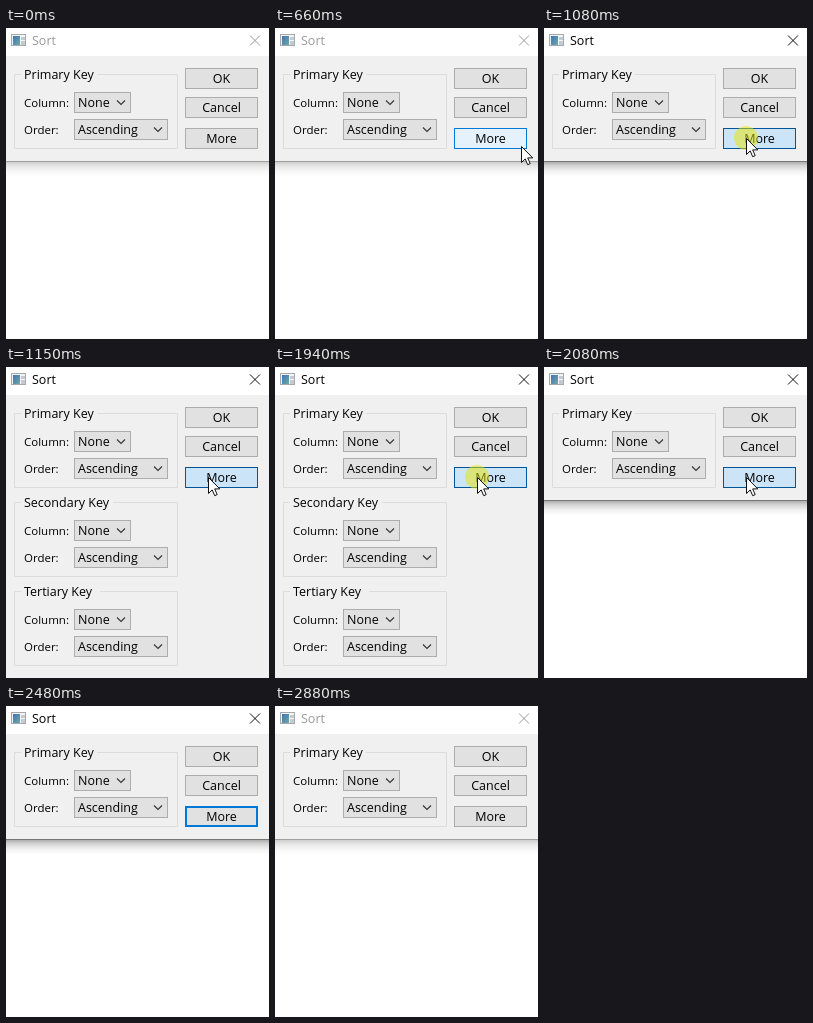
Recreate the animation shown at these times as an HTML page. Size 263 px wide and 311 px high, loop 2.95 s.

```html
<!DOCTYPE html>
<html lang="en">
<head>
<meta charset="utf-8">
<title>Sort</title>
<style>
html, body { margin: 0; width: 100%; height: 100%; overflow: hidden; background: #fff; }
svg { display: block; width: 263px; height: 311px; font: 12.5px "Open Sans", "Noto Sans", sans-serif; }
.label { font-size: 11.5px; }
.mid { text-anchor: middle; }
.box { fill: #e1e1e1; stroke: #adadad; }
.line { fill: none; stroke: #333; stroke-width: 1.1; }
</style>
</head>
<body>
<svg viewBox="0 0 263 311">
  <defs>
    <linearGradient id="fade" x2="0" y2="1">
      <stop offset="0" stop-opacity=".36"/>
      <stop offset=".3" stop-opacity=".17"/>
      <stop offset=".65" stop-opacity=".05"/>
      <stop offset="1" stop-opacity="0"/>
    </linearGradient>
    <linearGradient id="pane" x2="1" y2="1">
      <stop offset="0" stop-color="#3f74b5"/>
      <stop offset="1" stop-color="#6fa9a4"/>
    </linearGradient>
  </defs>
  <rect id="shadow" y="133" width="263" height="16" fill="url(#fade)"/>
  <rect id="panel" y="28" width="263" fill="#f0f0f0"/>
  <rect id="edge" y="133" width="263" height="1"/>
  <rect width="263" height="28" fill="#fff"/>
  <rect x="5.5" y="6.5" width="14" height="11" fill="#f4f4f4" stroke="#a3a9ae"/>
  <rect x="7" y="8" width="7" height="9" fill="url(#pane)"/>
  <path d="M15 9h4v3h-4zM15 13h4v4h-4z" fill="#c3cbd0"/>
  <g id="title">
    <text x="26" y="17">Sort</text>
    <path id="close" d="M244 7.5l10 10m0-10l-10 10" fill="none"/>
  </g>
  <g id="main"></g>
  <g id="extra"></g>
  <g id="buttons"></g>
  <circle id="halo" cx="202" cy="110" r="12" fill="#e6e600" fill-opacity=".5"/>
  <path id="cursor" d="M.5.5v16l3.7-3.6 2.5 5.8 2.5-1.1-2.5-5.7h5.1z" fill="#fff" stroke="#111" stroke-linejoin="round"/>
</svg>
<script>
const $ = id => document.getElementById(id);
const set = (id, attrs) => {
  for (const k in attrs) $(id).setAttribute(k, attrs[k]);
};
const show = (id, on) => set(id, { visibility: on ? 'visible' : 'hidden' });

const combo = (y, w, text) =>
  `<rect class="box" x="68.5" y="${y + .5}" width="${w}" height="20"/>
   <text x="72" y="${y + 15}">${text}</text>
   <path class="line" d="M${68 + w - 13} ${y + 8.5}l4 4 4-4"/>`;

const group = (name, y, gap) =>
  `<g transform="translate(0 ${y})">
   <path d="M15 46.5H8.5v74h163v-74H${gap}" fill="none" stroke="#dcdcdc"/>
   <text x="18" y="51">${name}</text>
   <text class="label" x="18" y="79">Column:</text>
   <text class="label" x="18" y="106">Order:</text>
   ${combo(64, 56, 'None')}${combo(91, 93, 'Ascending')}</g>`;

const button = (text, y) =>
  `<rect class="box" id="${text}" x="179.5" y="${y + .5}" width="72" height="20"/>
   <text class="mid" x="215.5" y="${y + 15}">${text}</text>`;

$('main').innerHTML = group('Primary Key', 0, 91);
$('extra').innerHTML = group('Secondary Key', 89, 107) + group('Tertiary Key', 178, 94);
$('buttons').innerHTML = button('OK', 40) + button('Cancel', 69) + button('More', 100);

const looks = {
  normal: ['#e1e1e1', '#adadad', 1],
  hover: ['#e5f1fb', '#0078d7', 1],
  pressed: ['#cce4f7', '#005499', 1],
  focus: ['#e1e1e1', '#0078d7', 2]
};

const STEP = 67.5, LOOP = 2950;
const rest = { x: 202, y: 110 };
const clamp = v => Math.min(1, Math.max(0, v));

// Pointer slides in from the right edge and leaves the same way.
function pointer(t) {
  let away = 0;
  if (t < 940) {
    const n = Math.floor((t - 600) / STEP + .02) + 1;
    away = (1 - clamp(n / 6)) ** 2;
  } else if (t >= 2140) {
    const n = Math.floor((t - 2140) / STEP + .02);
    away = clamp(n / 5) ** 1.6;
  }
  return { x: Math.round(rest.x + 64 * away), y: Math.round(rest.y + 12 * away) };
}

function draw(t) {
  const active = t >= 1010 && t < 2880;
  const open = t >= 1150 && t < 2080;
  const present = t >= 600 && t < 2480;
  const p = pointer(t);
  const over = present && p.x < 252 && p.y < 121;

  let look = 'normal';
  if (t >= 1080 && t < 2140) look = 'pressed';
  else if (over) look = 'hover';
  else if (active) look = 'focus';
  const [fill, stroke, width] = looks[look];
  const inset = width / 2;
  $('More').style.cssText = `fill:${fill};stroke:${stroke};stroke-width:${width}`;
  set('More', { x: 179 + inset, y: 100 + inset, width: 73 - width, height: 21 - width });

  set('panel', { height: open ? 283 : 105 });
  set('shadow', { opacity: active ? 1 : .6 });
  set('edge', { fill: active ? '#777' : '#a0a0a0' });
  set('title', { fill: active ? '#000' : '#999' });
  set('close', { stroke: active ? '#111' : '#999' });
  show('shadow', !open);
  show('edge', !open);
  show('extra', open);
  show('halo', (t >= 1010 && t < 1150) || (t >= 1940 && t < 2080));
  show('cursor', present);
  set('cursor', { transform: `translate(${p.x} ${p.y})` });
}

const start = performance.now();
function tick() {
  draw((performance.now() - start) % LOOP);
  requestAnimationFrame(tick);
}
tick();
</script>
</body>
</html>
```
